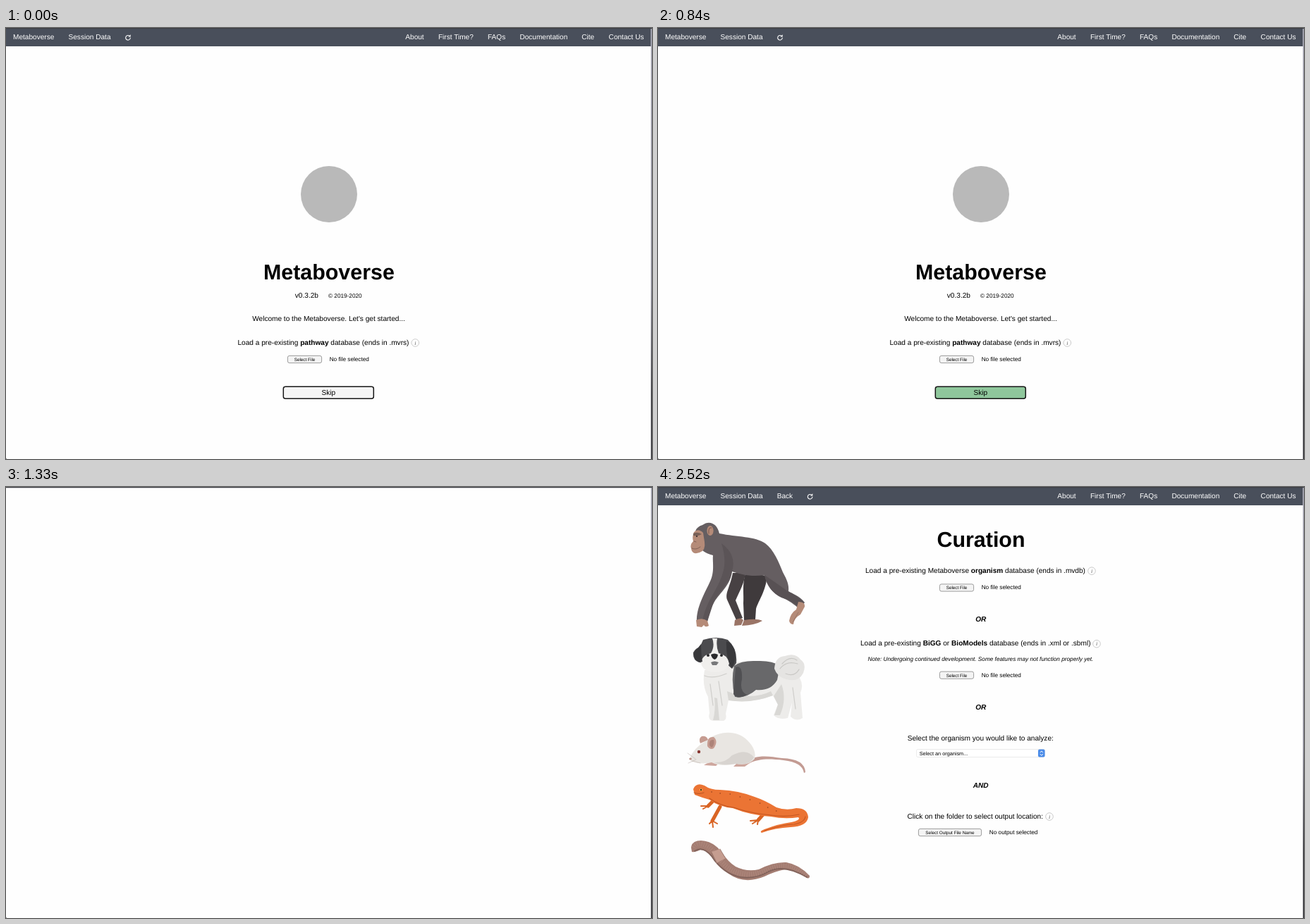
Recreate the animation shown at these times as an HTML page. Size 916 px wide and 612 px high, loop 2.59 s.

```html
<!DOCTYPE html>
<html lang="en">
<head>
<meta charset="utf-8">
<title>Metaboverse</title>
<style>
  html, body { margin: 0; width: 100%; height: 100%; overflow: hidden; background: #fefefe; }
  svg { display: block; width: 916px; height: 612px; }
  text { font: 10.1px "Liberation Sans", Arial, sans-serif; text-rendering: geometricPrecision; white-space: pre; }
  .small { font-size: 8.22px; }
  .tiny { font-size: 6.36px; }
  .option { font-size: 7.3px; }
  .title { font-size: 30.4px; font-weight: bold; }
  .mid { text-anchor: middle; }
  .nav { fill: #fff; }
  .bold { font-weight: bold; }
  .italic { font-style: italic; }
  .info { font: italic 8px "Liberation Serif", serif; fill: #555; }
  .line { fill: none; stroke-linecap: round; stroke-linejoin: round; }
</style>
</head>
<body>
<svg id="stage" viewBox="0 0 916 612"></svg>
<script>
const LOOP = 2590;
const HOVER = 840, BLANK = 1260, CURATION = 1680, OPTIONS = 2240;

const text = (x, y, s, cls = '') => `<text x="${x}" y="${y}" class="${cls}">${s}</text>`;
const bold = s => `<tspan class="bold">${s}</tspan>`;
const path = (d, fill, extra = '') => `<path d="${d}" fill="${fill}" ${extra}/>`;
const line = (d, color, width = 1, extra = '') =>
  `<path class="line" d="${d}" stroke="${color}" stroke-width="${width}" ${extra}/>`;
const dot = (x, y, rx, ry, fill) => `<ellipse cx="${x}" cy="${y}" rx="${rx}" ry="${ry}" fill="${fill}"/>`;
const box = (x, y, w, h, r, fill, stroke, width, extra = '') =>
  `<rect x="${x}" y="${y}" width="${w}" height="${h}" rx="${r}" fill="${fill}" stroke="${stroke}" stroke-width="${width}" ${extra}/>`;
const info = (x, y) =>
  `<circle cx="${x}" cy="${y}" r="5.3" fill="#fff" stroke="#c4c4c4" stroke-width=".9"/>` +
  text(x, y + 2.6, 'i', 'info mid');
const button = (x, y, w, label) =>
  box(x + .4, y + .4, w - .8, 10.2, 2.5, '#f4f4f4', '#858585', .8) +
  text(x + w / 2, y + 7.8, label, 'tiny mid');
const picker = (id, y, width, label) => {
  const left = 457.5 - width / 2, right = left + width;
  return `<g id="${id}">` +
    box(left, y, width, 11, 2, '#fff', '#dedede', .6) +
    text(left + 4.2, y + 8, label, 'option') +
    box(right - 9.5, y, 9.5, 11, 2, '#4a8be8', 'none', 0) +
    line(`M${right - 6.5} ${y + 4.4}l1.8-2 1.8 2m-3.6 2.4l1.8 2 1.8-2`, '#fff', 1) + '</g>';
};

function navBar(back) {
  const left = [[10, 'Metaboverse'], [88.5, 'Session Data']];
  if (back) left.push([168.7, 'Back']);
  const right = [[566.3, 'About'], [612.9, 'First Time?'], [683, 'FAQs'],
                 [728.4, 'Documentation'], [816.2, 'Cite'], [854.6, 'Contact Us']];
  const x = back ? 215.6 : 173;
  return box(0, 1, 914.5, 25, 0, '#494f5b', 'none', 0) +
    [...left, ...right].map(([x, s]) => text(x, 16.3, s, 'nav')).join('') +
    line(`M${x + 1.6} 10.9A3.3 3.3 0 1 0 ${x + 3.3} 14`, '#fff', 1.1) +
    path(`M${x + 3.7} 9.2v3.4h-3.4z`, '#fff');
}

const home = navBar(false) +
  dot(458, 236, 40, 40, '#b9b9b9') +
  text(457.9, 356.7, 'Metaboverse', 'title mid') +
  text(409.8, 383, 'v0.3.2b') + text(457, 383, '© 2019-2020', 'small') +
  text(457.5, 415.5, "Welcome to the Metaboverse. Let's get started...", 'mid') +
  text(328.5, 449.7, `Load a pre-existing ${bold('pathway')} database (ends in .mvrs)`) + info(580.3, 447) +
  button(399, 465, 49, 'Select File') + text(458.7, 472.9, 'No file selected', 'small') +
  box(393.3, 509.2, 128, 17, 3, '#f5f5f5', '#161616', 1.5, 'id="skip"') +
  text(457.3, 521, 'Skip', 'mid');

const ape =
  path('M124 122C119 140 122 152 121 165L122 189Q129 193 138 188L139 173C143 160 152 150 155 126Z', '#3f3a3c') +
  path('M106 122C102 143 95 150 98 160L111 189L120 186L110 161C116 147 122 138 124 122Z', '#474143') +
  path('M109 189Q117 184 121 189L118 196L108 197ZM122 189Q140 186 148 190Q138 196 119 197Z', '#9a7466') +
  path('M63 54C72 47 84 51 87 66C112 71 138 70 152 80C164 89 171 106 177 121C183 132 186 139 185 148C191 152 200 154 208 164L201 174Q190 163 176 157C161 150 154 139 151 125C132 128 118 124 105 120C103 139 88 150 80 163Q73 175 70 191H55C54 172 66 151 73 136C81 121 77 107 78 97C67 94 56 88 54 75C50 65 53 57 63 54Z', '#655e61') +
  path('M90 80Q112 96 105 120C100 139 86 149 79 163L70 191L63 191C67 164 84 147 91 125C97 108 94 94 90 80Z', '#5b5457') +
  path('M151 125Q170 138 184 148Q196 153 207 164L202 173Q190 161 175 157Q156 148 151 125Z', '#585154') +
  path('M51 64Q57 58 64 65L66 78Q68 90 59 93Q48 97 47 87Q45 82 50 77Q48 71 51 64Z', '#b58b78') +
  path('M50 66Q56 63 62 67Q57 70 50 69Z', '#786057') +
  line('M48 87Q54 90 60 85M51 77l3 1', '#76574d', .8) + dot(55, 70, 1.2, .9, '#33292a') +
  dot(74, 62, 4.6, 7, '#b58b78') + line('M72 66Q71 57 76 58', '#805f54', 1.2) +
  path('M54 189Q63 185 70 190L72 197Q67 200 65 196L62 199L55 198Z', '#b58b78') +
  path('M199 163Q209 163 208 170L202 181Q193 186 192 195Q187 195 186 190Q188 179 196 174Z', '#b58b78') +
  line('M191 192L199 178', '#8f6e61', .7);

const dog =
  path('M66 260Q62 282 71 298L73 321Q70 332 79 332H93Q98 330 96 322L100 303Q132 308 163 296L170 309L164 324Q170 331 184 328L190 306L188 326Q196 334 205 328L202 292Q209 276 193 262Q160 242 109 249Z', '#edecea') +
  path('M164 297L175 280Q183 301 173 324L165 324L170 309ZM84 300L87 331L78 331Q82 317 80 299ZM98 290Q132 304 160 290L163 296Q132 308 100 303Z', '#d9d8d5') +
  path('M108 254Q118 246 140 247Q162 246 173 254L169 274Q160 290 139 288Q126 300 109 298Q103 275 108 254Z', '#68686a') +
  path('M110 256Q120 252 119 273Q115 290 126 295Q112 303 107 294Z', '#505053') +
  path('M165 258Q166 241 180 240Q195 235 202 245Q211 251 206 264Q199 278 182 273Q169 270 165 258Z', '#e5e4e2') +
  line('M173 258Q182 246 198 251M181 265Q194 270 200 259M176 251Q187 239 197 246', '#c9c8c5', 1.2) +
  path('M64 217Q83 211 99 217Q113 230 111 250L105 258L96 250H66L58 249Q49 246 50 235Q54 228 59 228Z', '#4b4b4e') +
  path('M77 215L84 215Q82 226 86 236Q98 238 101 250Q99 262 81 263Q63 262 61 250Q62 239 75 236Q81 226 77 215Z', '#f0efed') +
  path('M97 219Q96 242 104 257Q112 248 109 232Q105 221 97 219ZM61 223Q61 238 63 248Q53 250 51 240Q50 233 57 228Z', '#38383b') +
  dot(71, 239, 2, 2, '#29292b') + dot(90, 239, 2, 2, '#29292b') +
  path('M75 238Q80 235 85 238Q84 244 80 245Q76 243 75 238Z', '#29292b') +
  path('M75 249Q80 246 86 249L83 253H77Z', '#77787a') +
  line('M74 280L78 310M86 276L91 310M191 285L195 315M66 268Q78 273 97 265', '#d0cfcc', 1.3);

const mouse =
  path('M120 392C140 379 155 382 176 385Q208 386 209 405L207 406Q205 391 178 388C158 386 144 385 128 393Z', '#c39b93') +
  path('M75 389L65 395L82 396L88 391ZM112 392L107 397H123L130 392Z', '#cda69d') +
  path('M45 386Q50 371 67 361C87 345 112 345 127 360Q140 373 137 386Q129 396 111 393Q89 398 76 391Q62 395 47 389Z', '#e9e6e2') +
  path('M105 381Q126 370 136 384Q130 396 111 393Q91 396 79 391Q96 392 105 381Z', '#d8d4d0') +
  path('M60 364Q57 357 62 354Q69 353 71 359ZM70 368Q69 354 79 355Q86 361 79 371Q74 374 70 368Z', '#c69c91') +
  path('M73 367Q72 358 79 359Q81 366 76 370Z', '#ad8379') +
  dot(58, 376, 2.2, 2.2, '#87352f') + dot(46, 386, 1.8, 1.6, '#b98f86') +
  line('M48 389L60 392M53 386L42 378M54 387L43 392', '#b7aaa5', .5);

const newt =
  line('M80 444L71 453M88 454L77 474M150 464L142 473', '#d96424', 5) +
  line('M71 453l-10 0M71 453l-7 4M77 474l-4 4M77 474l1 9M77 474l7 4M142 473l-11 1M142 473l-8 5M142 473l-1 6', '#d96424', 2) +
  path('M50 429Q54 419 66 424Q74 430 88 430Q114 431 137 440Q152 445 168 455Q182 460 196 456Q212 456 213 469Q211 482 188 483Q166 484 147 491Q143 489 151 486Q172 478 189 476Q203 473 199 469Q180 472 160 468Q131 466 106 456Q86 454 73 444Q62 441 52 437Z', '#eb7434') +
  line('M73 442Q88 453 107 455Q134 464 161 466Q181 469 200 465M151 488Q178 479 193 479Q208 476 209 468', '#c65721', 1.2) +
  line('M76 433h.1m12 2h.1m14 1h.1m14 4h.1m14 4h.1m14 5h.1m11 6h.1m12 5h.1', '#8f3f1c', 1.6) +
  dot(61, 430, 2.2, 1.8, '#f3b04a') + dot(61, 430, 1, 1.3, '#2d211c') +
  line('M51 434Q58 437 65 434', '#a74719', .7);

const worm =
  path('M47 512Q48 502 61 502Q78 503 89 517Q100 533 110 539Q126 547 143 543Q164 532 182 533Q200 536 215 552Q215 557 211 555Q196 543 180 543Q165 546 151 553Q122 565 100 549Q88 541 79 527Q70 515 60 515Q54 519 48 518Z', '#a47d72') +
  line('M52 517Q63 509 76 524Q92 549 117 554Q139 557 157 546Q179 535 211 554', '#82625a', 2) +
  line('M51 512C56 502 72 507 81 520S104 550 128 550S158 537 180 537Q196 538 212 553', '#bf9a8f', 7,
    'stroke-dasharray=".6 2.6" opacity=".55" style="stroke-linecap:butt"') +
  path('M76 518L88 514L96 527L83 534Z', '#c59d90') + line('M76 519L83 533M88 514L95 526', '#8f6b61', .7);

const curation = navBar(true) + ape + dog + mouse + newt + worm +
  text(458, 84.5, 'Curation', 'title mid') +
  text(294, 121.9, `Load a pre-existing Metaboverse ${bold('organism')} database (ends in .mvdb)`) + info(615, 119.2) +
  button(399, 137.5, 49, 'Select File') + text(458.7, 145.2, 'No file selected', 'small') +
  text(457.7, 191.2, 'OR', 'bold italic mid') +
  text(287, 225.4, `Load a pre-existing ${bold('BiGG')} or ${bold('BioModels')} database (ends in .xml or .sbml)`) + info(622, 222.7) +
  text(457.5, 247.4, 'Note: Undergoing continued development. Some features may not function properly yet.', 'small italic mid') +
  button(399, 261.7, 49, 'Select File') + text(458.7, 269.5, 'No file selected', 'small') +
  text(457.7, 315.5, 'OR', 'bold italic mid') +
  text(457.3, 359.7, 'Select the organism you would like to analyze:', 'mid') +
  picker('narrow', 372.5, 22, '') + picker('wide', 372.5, 182, 'Select an organism...') +
  text(457.7, 426.5, 'AND', 'bold italic mid') +
  text(353.5, 470.9, 'Click on the folder to select output location:') + info(555, 468) +
  button(369, 485, 90, 'Select Output File Name') + text(469.8, 493.2, 'No output selected', 'small');

const $ = id => document.getElementById(id);
$('stage').innerHTML =
  `<defs><linearGradient id="edge" x2="0" y2="1"><stop stop-color="#9a9aa8"/>
   <stop offset=".6" stop-color="#7d7d8b"/><stop offset=".85" stop-color="#25252b"/></linearGradient></defs>` +
  `<g id="home">${home}</g><g id="curation">${curation}</g>` +
  box(0, 0, 916, 1.2, 0, '#3c3e43', 'none', 0) + box(914.6, 1, 1.4, 611, 0, 'url(#edge)', 'none', 0) +
  path('M0 610.5L1 612H0Z', '#555');

const show = (id, on) => $(id).setAttribute('display', on ? 'inline' : 'none');

function draw(now) {
  const t = now % LOOP;
  show('home', t < BLANK);
  show('curation', t >= CURATION);
  show('narrow', t < OPTIONS);
  show('wide', t >= OPTIONS);
  $('skip').setAttribute('fill', t >= HOVER ? '#8fc79c' : '#f5f5f5');
  requestAnimationFrame(draw);
}
draw(performance.now());
</script>
</body>
</html>
```
